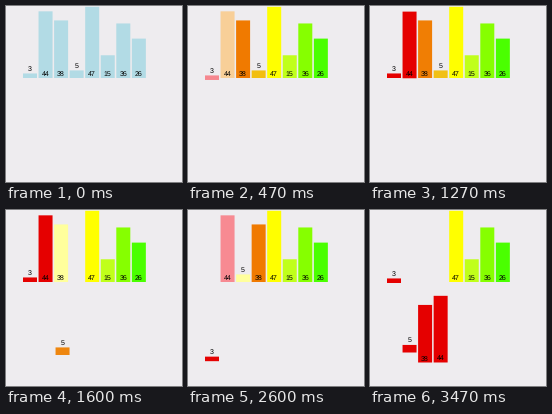
Animation of 176x176 px, one loop 3.53 s. Source, as a matplotlib script:

```python
import numpy as np
import matplotlib.pyplot as plt
from matplotlib.animation import FuncAnimation
from matplotlib.colors import to_rgb
from matplotlib.patches import Rectangle

SIZE, DPI = 176, 100
TICKS, TICK_MS = 353, 10
POSE_MS = 1000 / 15  # poses change 15 times a second, on whole ticks
VALUES = [3, 44, 38, 5, 47, 15, 36, 26]
LEFT, PITCH, WIDTH = 17, 15.55, 14
BASE, DROP, UNIT = 72, 80.5, 1.515
DURATION = 3.5  # poses per transition; the next step may cut it short

BACKGROUND, PLAIN = "#eeecef", "#b2dbe5"
RAINBOW = ["#e50000", "#eb4000", "#f07a00", "#f2be10",
           "#ffff00", "#c0ff1a", "#86ff00", "#4aff00"]
TINTS = ["#f78c94", "#f8d19a", "#ffff9c", "#dcf79c"]


def ease(u):
    u = min(max(u, 0), 1)
    return 4 * u ** 3 if u < 0.5 else 1 - 4 * (1 - u) ** 3


def merge_sort_steps():
    """Return the start state and the list of target states.

    A state row is (slot, lowered, r, g, b) for one bar.
    """
    state = np.zeros((len(VALUES), 5))
    state[:, 0] = np.arange(len(VALUES))
    steps = []

    def paint(bar, color):
        state[bar, 2:] = to_rgb(color)

    def save():
        steps.append(state.copy())

    def merge(left, right, slot, hues):
        queues = [list(left), list(right)]

        def tint_heads():
            for queue, hue in zip(queues, hues):
                if queue:
                    paint(queue[0], TINTS[hue])

        tint_heads()
        save()
        merged = []
        while any(queues):
            source = min((q for q in queues if q), key=lambda q: VALUES[q[0]])
            bar = source.pop(0)
            state[bar, :2] = slot + len(merged), 1
            paint(bar, RAINBOW[hues[0]])
            merged.append(bar)
            tint_heads()
            save()
        for bar in merged:
            state[bar, 1] = 0
            save()
        return merged

    for bar in range(len(VALUES)):
        paint(bar, PLAIN)
    start = state.copy()
    for bar, color in enumerate(RAINBOW):
        paint(bar, color)
    save()
    first = merge([0], [1], 0, (0, 1))
    second = merge([2], [3], 2, (2, 3))
    merge(first, second, 0, (0, 2))
    return start, steps


START, STEPS = merge_sort_steps()
# Steps come about every three poses, with a slight drift.
TIMES = np.interp(np.arange(18), [0, 2, 4, 7, 10, 12, 17],
                  [0.4, 6.36, 12.0, 21.5, 30.69, 36.06, 50.9])


def state_at(pose):
    state = START.copy()
    ends = np.append(TIMES[1:], np.inf)
    for target, begin, end in zip(STEPS, TIMES, ends):
        if begin > pose:
            break
        elapsed = min(pose, end) - begin
        state += (target - state) * ease(elapsed / DURATION)
    return state


plt.rcParams["text.hinting"] = "none"
fig = plt.figure(figsize=(SIZE / DPI, SIZE / DPI), dpi=DPI, facecolor=BACKGROUND)
ax = fig.add_axes([0, 0, 1, 1])
ax.set_xlim(0, SIZE)
ax.set_ylim(SIZE, 0)
ax.axis("off")

bars, labels = [], []
for i, value in enumerate(VALUES):
    bars.append(ax.add_patch(
        Rectangle((0, 0), WIDTH, value * UNIT, linewidth=0, snap=False,
                  zorder=2 + i)))
    labels.append(ax.text(0, 0, str(value), family="Liberation Sans",
                          fontsize=7 * 72 / DPI, color="black",
                          ha="center", va="baseline", zorder=2.5 + i))


def draw(tick):
    pose = int((tick + 0.5) * TICK_MS / POSE_MS)
    for row, value, bar, label in zip(state_at(pose), VALUES, bars, labels):
        x = LEFT + PITCH * row[0]
        bottom = BASE + DROP * row[1]
        top = bottom - value * UNIT
        bar.set_xy((x, top))
        bar.set_facecolor(np.clip(row[2:], 0, 1))
        label.set_position((x + WIDTH / 2, bottom - 2 if value > 10 else top - 2.5))
    return bars + labels


anim = FuncAnimation(fig, draw, frames=TICKS, interval=TICK_MS,
                     init_func=lambda: draw(0), repeat=True, repeat_delay=0)
plt.show()
```
